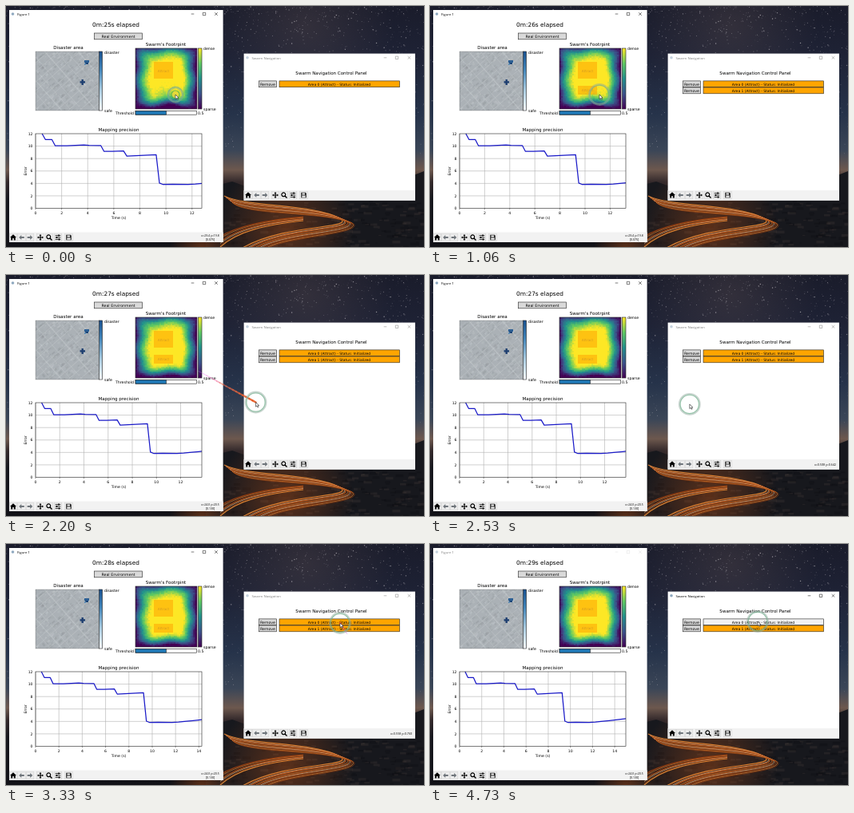
An HTML page with a canvas for the animation above (4800 ms loop, 523x302 px).

```html
<!DOCTYPE html>
<html lang="en">
<head>
<meta charset="utf-8">
<title>Swarm navigation</title>
<style>
html, body { margin: 0; width: 523px; height: 302px; overflow: hidden; background: #15171f; }
canvas, svg { position: absolute; left: 0; top: 0; display: block; }
text { font-family: "DejaVu Sans", sans-serif; }
.ui { font-family: "Open Sans", "Noto Sans", sans-serif; }
</style>
</head>
<body>
<canvas id="back" width="523" height="302"></canvas>
<svg id="stage" width="523" height="302" viewBox="0 0 523 302"></svg>
<script>
const LOOP = 4800, FRAME = LOOP / 72, PLOT_STEP = 510;
const ctx = document.getElementById('back').getContext('2d');
const stage = document.getElementById('stage');

let seed = 11;
const rnd = () => (seed = (seed * 16807) % 2147483647) / 2147483647;
const clamp = v => Math.max(0, Math.min(1, v));
const smooth = v => { v = clamp(v); return v * v * (3 - 2 * v); };

const VIRIDIS = [[68, 1, 84], [59, 82, 139], [33, 145, 140], [94, 201, 98], [253, 231, 37]];
function viridis(v) {
  const p = clamp(v) * 4, i = Math.min(3, Math.floor(p));
  return `rgb(${VIRIDIS[i].map((c, k) => Math.round(c + (VIRIDIS[i + 1][k] - c) * (p - i)))})`;
}
function box(x, y, w, h, fill) {
  ctx.fillStyle = fill;
  ctx.fillRect(x, y, w, h);
}
function ramp(x, y0, y1, stops) {
  const g = ctx.createLinearGradient(x, y0, x, y1);
  stops.forEach(([p, c]) => g.addColorStop(p, c));
  return g;
}
function glow(x, y, r, color) {
  const g = ctx.createRadialGradient(x, y, 2, x, y, r);
  g.addColorStop(0, `rgba(${color},.4)`);
  g.addColorStop(1, `rgba(${color},0)`);
  box(x - r, y - r, 2 * r, 2 * r, g);
}

function trails(count, line) {
  const tones = ['#ff9a3a', '#a8430f', '#ffe0b0', '#d9651c', '#7a3212'];
  for (let i = 0; i < count; i++) {
    ctx.strokeStyle = tones[i % 5];
    ctx.globalAlpha = .8;
    ctx.lineWidth = i % 3 ? .7 : 1.2;
    ctx.beginPath();
    line(i);
    ctx.stroke();
  }
  ctx.globalAlpha = 1;
}

function drawNight() {
  box(0, 0, 523, 302, ramp(0, 0, 302, [[0, '#1a1c2b'], [.2, '#1e2235'], [.45, '#26334a'],
    [.6, '#3b4657'], [.68, '#6d584e'], [.73, '#33292b'], [.8, '#17181e'], [1, '#121217']]));
  glow(375, 25, 110, '84,72,76');
  for (let i = 0; i < 2000; i++) {
    const s = rnd() < .2 ? 1.2 : .8;
    box(rnd() * 523, rnd() ** 1.5 * 185, s, s, `rgba(205,200,205,${.08 + rnd() ** 2 * .65})`);
  }
  ctx.fillStyle = '#17181d';
  ctx.beginPath();
  ctx.moveTo(250, 302); ctx.lineTo(250, 228); ctx.lineTo(283, 220); ctx.lineTo(300, 226);
  ctx.lineTo(420, 240); ctx.lineTo(505, 214); ctx.lineTo(523, 207); ctx.lineTo(523, 302);
  ctx.fill();
  for (let i = 0; i < 240; i++) {
    const w = 2 + rnd() * 9;
    box(272 + rnd() * 250, 244 + rnd() * 58, w, w / 3, `rgba(${rnd() < .5 ? '84,70,64' : '6,7,11'},.22)`);
  }
  glow(350, 278, 85, '190,85,25');
  glow(245, 304, 40, '190,85,25');
  trails(12, i => {
    ctx.moveTo(273 + i, 238 + i * .8);
    ctx.bezierCurveTo(300, 252 + i, 385 + i, 248 + i * .8, 418 + i * 1.5, 266 + i * .6);
    ctx.bezierCurveTo(438 + i, 280 + i * .5, 350, 272 + i * 1.6, 296 + i * 3, 303);
  });
  trails(7, i => {
    ctx.moveTo(268, 302 - i * 2.2);
    ctx.bezierCurveTo(290, 282 - i, 325, 274 - i, 372, 269 - i * .8);
  });
}

function drawMap() {
  ctx.save();
  ctx.beginPath();
  ctx.rect(37, 57, 79, 74);
  ctx.clip();
  box(37, 57, 79, 74, '#abb1b6');
  ctx.translate(77, 94);
  ctx.rotate(-.72);
  for (let i = 0; i < 1100; i++) {
    const g = 142 + rnd() * 58 | 0;
    box(rnd() * 120 - 60, rnd() * 120 - 60, 1 + rnd() * 4, 1 + rnd() * 2, `rgba(${g},${g + 6},${g + 10},.45)`);
  }
  for (let i = -6; i < 7; i++) {
    box(-60, i * 9 + rnd() * 3, 120, .7, 'rgba(205,209,212,.4)');
    box(i * 11 + rnd() * 4, -60, i % 3 ? .6 : 1.4, 120, 'rgba(203,207,210,.4)');
  }
  ctx.restore();
  box(98, 68, 6, 3, '#2c5f94');
  box(99, 71, 4, 2, '#1d4678');
  box(98, 72, 2, 2, '#5f8db4');
  box(94.5, 92, 2.4, 7, '#1f3f70');
  box(92.5, 94.2, 6.5, 2.4, '#1f3f70');
}

function drawHeat(n) {
  const notch = .24 * clamp(1 - n / 4), keep = seed;
  seed = 771;
  for (let j = 0; j < 38; j++) for (let i = 0; i < 39; i++) {
    const u = (i + .5) / 39, v = (j + .5) / 38;
    const wob = .022 * Math.sin(v * 13 + 1) + .022 * Math.cos(u * 11);
    const side = smooth((u + wob) / .27) * smooth((1 - u + wob) / .28);
    const ends = smooth((v + wob + .03) / .27) * smooth((1 - v - wob) / .28);
    const dip = notch * Math.exp(-((u - .52) ** 2 / .05 + (v - .84) ** 2 / .03));
    const val = 1.04 * Math.pow(side * ends, .62) - dip + (rnd() - .5) * .07;
    box(162 + i * 2 - (i > 37 ? 1 : 0), 53 + j * 2, 2, 2, viridis(val));
  }
  seed = keep;
  const patch = (y, h) => box(185, y, 24, h, 'rgba(255,165,0,.55)');
  patch(70, 21);
  if (n > 1) patch(100, 11);
}

function drawStill() {
  drawNight();
  box(4, 5, 267.6, 291, '#fff');
  box(297.6, 59.6, 214.4, 184, '#fff');
  box(4, 283.5, 267.6, 12.5, '#f2f2f2');
  box(297.6, 231, 214.4, 12.6, '#f2f2f2');
  drawMap();
  box(116.5, 57, 4, 74, ramp(0, 57, 131, [[0, '#174f8e'], [.3, '#3f83b8'], [.65, '#a9cbe0'], [1, '#f7fbff']]));
  box(240.5, 53, 4.5, 76, ramp(0, 53, 129, [0, 1, 2, 3, 4].map(i => [i / 4, viridis(1 - i / 4)])));
}

const txt = (x, y, s, size = 4.7, anchor = 'start', more = '') =>
  `<text x="${x}" y="${y}" font-size="${size}" text-anchor="${anchor}" ${more}>${s}</text>`;
const rect = (x, y, w, h, fill = 'none', more = '') =>
  `<rect x="${x}" y="${y}" width="${w}" height="${h}" fill="${fill}" stroke="#222" stroke-width=".6" ${more}/>`;

function toolbar(x, y) {
  const at = (dx, inner) => `<g transform="translate(${x + dx} ${y})">`
    + `<rect x="-4.8" y="-4.8" width="9.6" height="9.6" fill="#ececec" stroke="#cfcfcf" stroke-width=".5"/>${inner}</g>`;
  const arrow = 'M-3.3 0L-.2-3V-1H3.3V1H-.2V3Z';
  return at(0, '<path d="M-4 0L0-3.7L4 0H2.8V3.4H.8V1H-.8V3.4H-2.8V0Z"/>')
    + at(10.5, `<path d="${arrow}" fill="#6f757b"/>`)
    + at(21, `<path d="${arrow}" fill="#6f757b" transform="scale(-1 1)"/>`)
    + at(34, '<path d="M-3 0H3M0-3V3" stroke="#000" stroke-width="1.2"/><path d="M-4 0l1.8-1.5v3zM4 0l-1.8-1.5v3zM0-4l-1.5 1.8h3zM0 4l-1.5-1.8h3z"/>')
    + at(45, '<circle cx="-.7" cy="-.7" r="2.4" fill="none" stroke="#000" stroke-width="1.2"/><path d="M1 1L3.5 3.5" stroke="#000" stroke-width="1.5"/>')
    + at(56, '<path d="M-3.3-2.4H3.3M-3.3 0H3.3M-3.3 2.4H3.3" stroke="#000" stroke-width=".8"/><path d="M1-3.4v2M-1.5-1v2M1.5 1.4v2" stroke="#000" stroke-width="1.5"/>')
    + at(69.5, '<path d="M-3.3-3.3H2.3L3.3-2.3V3.3H-3.3Z" fill="#222"/><path d="M-2-2.6H1.5V-.6H-2ZM-2.2 .5H2.2V2.7H-2.2Z" fill="#eee"/>');
}
function caption(id, x, y, name, xs) {
  const [a, b, c] = xs;
  return `<g id="${id}"><circle cx="${x}" cy="${y}" r="1.8" fill="#8fa9c0"/>`
    + txt(x + 5.5, y + 1.8, name, 4.3, 'start', 'class="ui"')
    + `<path id="${id}Ctl" fill="none" stroke="#222" stroke-width=".6" d="M${a - 1.8} ${y}h3.6M${b - 1.7} ${y - 1.7}h3.4v3.4h-3.4zM${c - 1.8} ${y - 1.8}l3.6 3.6m0-3.6l-3.6 3.6"/></g>`;
}
const row = (i, y) => `<g id="row${i}">${rect(316.5, y, 22, 7.8, '#d9d9d9')}${txt(327.5, y + 5.6, 'Remove', 4.7, 'middle')}`
  + rect(342, y, 150.5, 7.8, '#ffa500', `id="bar${i}"`)
  + txt(417, y + 5.6, `Area ${i} (Attract) - Status: Initialized`, 4.5, 'middle') + '</g>';
const tag = (id, y) => txt(197, y, 'Attract', 4.2, 'middle', `id="${id}" fill="#d39a22"`);

stage.innerHTML = caption('capA', 8.5, 10, 'Figure 1', [233.5, 248, 263])
  + caption('capB', 302, 64.8, 'Swarm Navigation', [474.5, 489, 504.5])
  + txt(137.5, 26, '', 7.4, 'middle', 'id="clock"')
  + rect(110.5, 34, 60, 7.8, '#d9d9d9') + txt(140.5, 39.6, 'Real Environment', 4.75, 'middle')
  + txt(78, 54.3, 'Disaster area', 5.6, 'middle') + txt(200, 50.2, 'Swarm\'s Footrpint', 5.6, 'middle')
  + rect(37, 57, 79.3, 74, 'none', 'stroke-opacity=".35"') + rect(116.5, 57, 4, 74) + rect(162, 53, 77, 76) + rect(240.5, 53, 4.5, 76)
  + txt(123, 60, 'disaster') + txt(123, 132.6, 'safe') + txt(247, 55.3, 'dense') + txt(247, 130.6, 'sparse')
  + tag('tag0', 82.5) + tag('tag1', 107)
  + txt(160, 135.6, 'Threshold', 4.7, 'end') + rect(162, 131.6, 76.5, 4.6, '#fff') + rect(162, 131.6, 38.5, 4.6, '#1f77b4') + txt(240, 135.6, '0.5')
  + txt(141, 157.3, 'Mapping precision', 5.6, 'middle')
  + txt(0, 0, 'Error', 4.6, 'middle', 'transform="translate(25.5 207) rotate(-90)"') + txt(141, 267.3, 'Time (s)', 4.6, 'middle')
  + '<path id="grid" stroke="#b0b0b0" stroke-width=".6"/>'
  + '<path id="curve" fill="none" stroke="#1a1ac8" stroke-width="1.25" stroke-linejoin="round"/>'
  + rect(37, 160, 208, 93.5) + '<g id="ticks"></g>'
  + [0, 2, 4, 6, 8, 10, 12].map(v => txt(33.5, 255.2 - v * 7.79, v, 4.6, 'end')).join('')
  + toolbar(9, 290) + toolbar(303, 237)
  + txt(255.5, 288.8, '', 3.5, 'middle', 'id="pos" class="ui"') + txt(255.5, 294, '', 3.5, 'middle', 'id="val" class="ui"')
  + txt(508, 238.6, '', 3.6, 'end', 'id="posB" class="ui"')
  + txt(407, 86.3, 'Swarm Navigation Control Panel', 5.55, 'middle') + row(0, 93.9) + row(1, 102)
  + '<g id="trail" stroke-linecap="round"></g><g id="mouse"><circle id="halo" fill="none" stroke="#8fa99d" stroke-width="2.8" opacity=".5"/>'
  + '<circle id="ring" fill="none" stroke="#5fb583" stroke-width="1.1" opacity=".5"/><circle id="core" fill="#f2d93a" stroke="#4fb04f" stroke-width="1.2"/>'
  + '<path d="M0 0V5.6L1.4 4.4L2.4 6.4L3.3 6L2.4 4.1H4.1Z" fill="#fff" stroke="#222" stroke-width=".6"/></g>';

const el = {};
stage.querySelectorAll('[id]').forEach(e => el[e.id] = e);
const show = (e, on) => e.setAttribute('display', on ? 'inline' : 'none');

const ERR = [[.5, 12], [.75, 11.07], [1.25, 11.07], [1.5, 10.07], [2.4, 10.07], [3.7, 10.2], [4.1, 10.12], [5, 10.1],
  [5.25, 9.15], [5.9, 9.15], [6.75, 9.22], [7, 8.4], [9.25, 8.62], [9.5, 4.05], [9.75, 3.85], [10.5, 3.87], [11.7, 3.82],
  [12.25, 3.9], [12.75, 4], [13.5, 4.13], [14.25, 4.28], [15, 4.45]];

function drawPlot(n) {
  const end = 12.75 + n / 4, px = u => 37 + u * 208 / end, py = v => 253.5 - v * 7.79;
  let grid = '', ticks = '';
  for (let v = 2; v < 12; v += 2) grid += `M37 ${py(v)}H245`;
  for (let u = 0; u <= end; u += 2) {
    grid += `M${px(u)} 160V253.5`;
    ticks += `<path d="M${px(u)} 253.5v1.8" stroke="#222" stroke-width=".5"/>` + txt(px(u), 261, u, 4.6, 'middle');
  }
  const pts = ERR.filter(p => p[0] <= end);
  const next = ERR[pts.length];
  if (next) {
    const last = pts[pts.length - 1], k = (end - last[0]) / (next[0] - last[0]);
    pts.push([end, last[1] + (next[1] - last[1]) * k]);
  }
  el.grid.setAttribute('d', grid);
  el.ticks.innerHTML = ticks;
  el.curve.setAttribute('d', 'M' + pts.map(p => `${px(p[0]).toFixed(2)} ${py(p[1]).toFixed(2)}`).join('L'));
  el.clock.textContent = `0m:${Math.floor(25.2 + n / 2)}s elapsed`;
}

// time, x, y of the pointer tip
const PATH = [[0, 212, 111], [1960, 212, 111], [2070, 240, 120], [2200, 312.5, 159.5], [2330, 322, 164], [2620, 326, 161],
  [2730, 344, 154], [2860, 408, 126], [2960, 426, 115], [3200, 427, 113], [3330, 418, 99], [3800, 414, 98], [4300, 410, 97], [4800, 410, 97]];
function pointer(t) {
  let i = 1;
  while (i < PATH.length - 1 && PATH[i][0] < t) i++;
  const [a, b] = [PATH[i - 1], PATH[i]], k = clamp((t - a[0]) / (b[0] - a[0]));
  return [a[1] + (b[1] - a[1]) * k, a[2] + (b[2] - a[2]) * k];
}
function drawTrail(t) {
  const parts = 18, span = 132;
  let out = '', p = pointer(Math.max(0, t - span));
  for (let i = 1; i <= parts; i++) {
    const k = i / parts, q = pointer(Math.max(0, t - span * (1 - k)));
    if (Math.hypot(q[0] - p[0], q[1] - p[1]) > .4) {
      const hue = k < .4 ? 265 + k * 200 : 5 + k * 12;
      out += `<path d="M${p}L${q}" stroke="hsl(${hue} 80% ${72 - k * 20}%)" stroke-width="${.8 + k * 1.7}" opacity="${.25 + k * .65}"/>`;
    }
    p = q;
  }
  el.trail.innerHTML = out;
}

function focus(right) {
  el.capA.setAttribute('opacity', right ? .5 : 1);
  el.capACtl.setAttribute('opacity', right ? .25 : 1);
  el.capB.setAttribute('opacity', right ? 1 : .5);
}

let drawn = -1;
function render(ms) {
  const t = Math.floor((ms % LOOP + 7) / FRAME) * FRAME % LOOP;
  const n = Math.floor(t / PLOT_STEP);
  if (n !== drawn) {
    drawn = n;
    drawHeat(n);
    drawPlot(n);
  }
  show(el.row1, n > 1);
  show(el.tag1, n > 1);
  const left = t >= 2050;
  el.pos.textContent = left ? 'x=24.0 y=20.5' : 'x=29.4 y=19.8';
  el.val.textContent = left ? '[0.130]' : '[0.075]';
  el.posB.textContent = t < 2330 || t > 4330 ? '' : t < 3200 ? 'x=0.508 y=0.642' : 'x=0.558 y=0.760';
  focus(t >= 4400);
  el.bar0.setAttribute('fill', t >= 4460 ? '#f2f2f2' : '#ffa500');
  const [x, y] = pointer(t), grow = smooth(t / 400);
  el.mouse.setAttribute('transform', `translate(${x} ${y})`);
  el.halo.setAttribute('r', 9 + 3.5 * grow);
  el.ring.setAttribute('r', 9.5 + 2.2 * grow);
  el.core.setAttribute('r', 5 + 6 * grow);
  el.core.setAttribute('opacity', .75 * (1 - grow));
  drawTrail(t);
}

drawStill();
const start = performance.now();
(function tick() {
  render(performance.now() - start);
  requestAnimationFrame(tick);
})();
</script>
</body>
</html>
```
